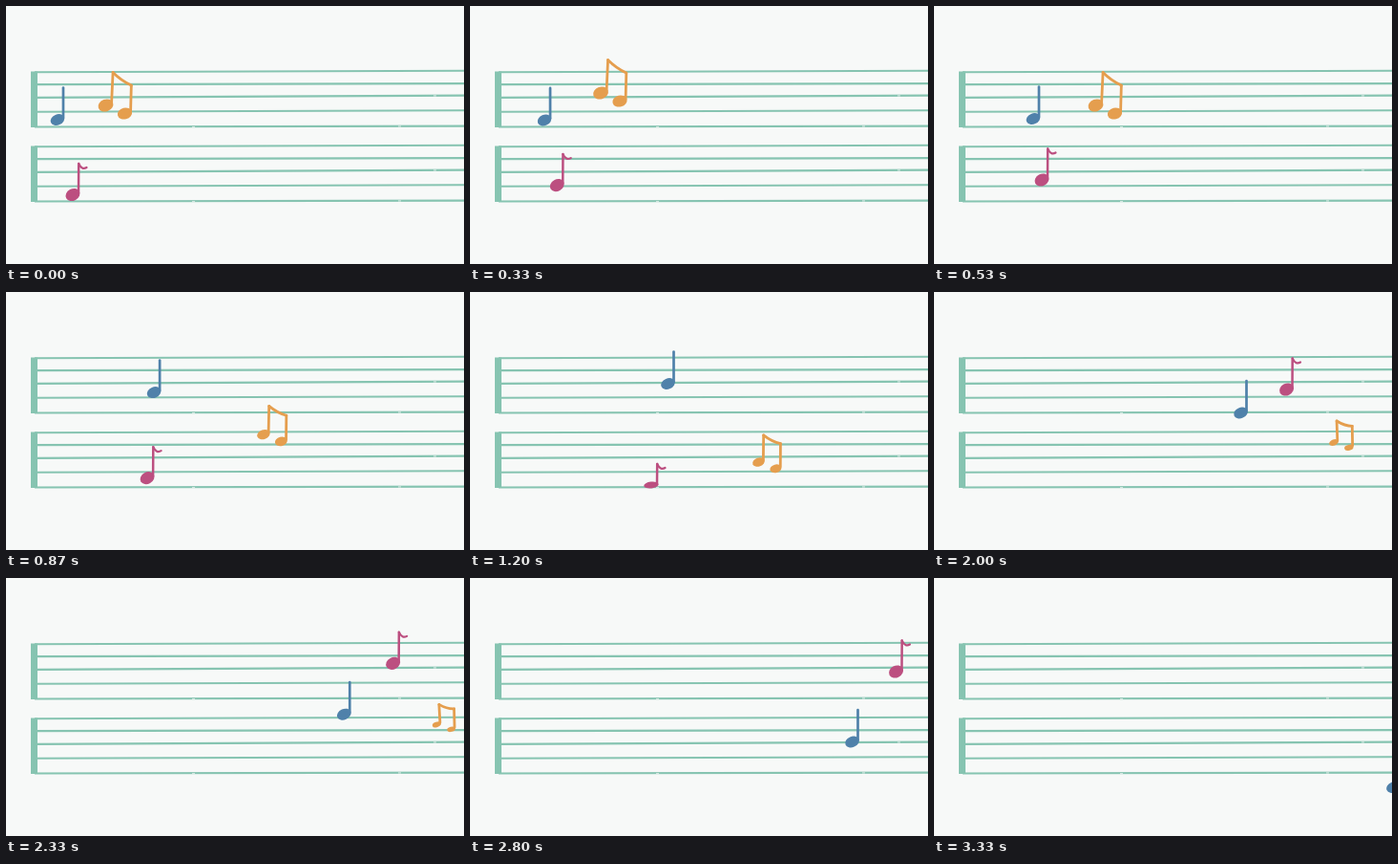
Recreate the animation shown at these times as an HTML page with a canvas. Size 480 by 270 pixels, loop 3.39 s.

```html
<!DOCTYPE html>
<html lang="en">
<head>
<meta charset="utf-8">
<title>Hopping notes</title>
<style>
html, body { margin: 0; width: 100%; height: 100%; overflow: hidden; background: #f7f9f8; }
canvas { display: block; width: 480px; height: 270px; }
</style>
</head>
<body>
<canvas id="stage" width="480" height="270"></canvas>
<script>
const ctx = document.getElementById('stage').getContext('2d');
const LOOP = 3390;
const PAPER = '#f7f9f8', GREEN = '#86c4b1';
const BLUE = '#4f81aa', ORANGE = '#e59e4e', PINK = '#bc4f80';

// Fifteen ticks a second; on these ticks the previous drawing is held.
const HELD = new Set([3, 9, 12, 14, 17, 20, 22, 25, 28, 31, 34, 36, 45, 47]);
const PINK_LANDING = 18;

// Points each note passes through: tick, x, y.
const bluePath = [[2, 54, 119], [8, 104, 118], [18, 207.5, 96], [24, 265.5, 120],
  [30, 321.5, 126.5], [42, 400.5, 171.5], [50, 481.5, 219]];
const pinkPath = [[2, 70, 197.5], [8, 113, 182], [18, 190, 202], [24, 276.5, 153],
  [30, 369.5, 102], [39, 428, 87], [42, 446.5, 98], [48, 492, 108]];
const pairPath = [[2, 104.5, 104], [5, 137, 91], [8, 169.5, 104], [11, 250, 134],
  [18, 302.5, 178], [24, 379, 170], [30, 419, 157.5], [41, 490, 150]];

// Smooth curve through the points of a path.
function along(path, tick) {
  const last = path.length - 1;
  const t = Math.min(Math.max(tick, path[0][0]), path[last][0]);
  let i = 0;
  while (i < last - 1 && t >= path[i + 1][0]) i++;
  const a = path[i], b = path[i + 1], span = b[0] - a[0];
  const u = (t - a[0]) / span, v = 1 - u;
  const slope = (k, c) => {
    const p = path[Math.max(k - 1, 0)], n = path[Math.min(k + 1, last)];
    return (n[c] - p[c]) / (n[0] - p[0]) * span;
  };
  return [1, 2].map(c =>
    a[c] * v * v * (1 + 2 * u) + b[c] * u * u * (3 - 2 * u) +
    slope(i, c) * u * v * v - slope(i + 1, c) * u * u * v);
}

function tickAt(time) {
  let tick = 0;
  while (10 * Math.round((tick + 1) * 20 / 3) <= time) tick++;
  return HELD.has(tick) ? tick - 1 : tick;
}

function ink(color) {
  ctx.fillStyle = ctx.strokeStyle = color;
  ctx.lineCap = ctx.lineJoin = 'round';
}

function head(x, y, rx, ry, tilt) {
  ctx.beginPath();
  ctx.ellipse(x, y, rx, ry, tilt, 0, Math.PI * 2);
  ctx.fill();
}

function line(width, x1, y1, x2, y2) {
  ctx.lineWidth = width;
  ctx.beginPath();
  ctx.moveTo(x1, y1);
  ctx.lineTo(x2, y2);
  ctx.stroke();
}

function curve(width, x1, y1, cx, cy, x2, y2) {
  ctx.lineWidth = width;
  ctx.beginPath();
  ctx.moveTo(x1, y1);
  ctx.quadraticCurveTo(cx, cy, x2, y2);
  ctx.stroke();
}

function drawStaff(top) {
  ink(GREEN);
  ctx.fillRect(26, top - .8, 7, 58.5);
  ctx.lineCap = 'butt';
  [1.5, 1, 2.3, 1.5, .9].forEach((rise, i) => {
    const y = top + 12.3 * i + .5 * i * i;
    line(2.1, 30, y, 480, y - rise);
  });
  // Small gaps in the crayon.
  ctx.fillStyle = 'rgba(247,249,248,.65)';
  for (const [x, y] of [[448, 24], [195, 56.7], [411, 56]]) ctx.fillRect(x, top + y, 3, 1.2);
}

function drawBlue(tick) {
  const [x, y] = along(bluePath, tick);
  ink(BLUE);
  head(x, y, 7.6, 5.6, -.42);
  line(2.7, x + 6, y - 2, x + 6, y - 33.5);
}

function drawPink(tick) {
  const [x, y] = along(pinkPath, tick);
  const squash = Math.exp(-(((tick - PINK_LANDING) / 2) ** 2));
  const sx = x + 6, top = y - 2.5 - 30 * (1 - .35 * squash);
  ink(PINK);
  head(x, y, 7.8, 6.2 * (1 - .45 * squash), -.5 + .38 * squash);
  line(2.5, sx, y - 2, sx + .2, top);
  curve(2.2, sx + .2, top, sx + 3.5, top + 7, sx + 8.5, top + 4);
}

// The beamed pair shrinks and flattens as it travels.
function drawPair(tick) {
  const [x, y] = along(pairPath, tick);
  const s = 1 - Math.max(0, x - 170) * .0015;
  const rx = 8.1 * s, ry = 6.3 * s ** 1.5;
  const gap = 20 * Math.sqrt(s), drop = 8.5 * s, lean = 6 * (s - .75);
  const x1 = x + rx * .75, x2 = x1 + gap;
  const top = y - 2.5 - 32 * s, low = top + 1.6 * drop * s;
  ink(ORANGE);
  head(x, y, rx, ry, -.35);
  head(x + gap, y + drop, rx * .95, ry * .95, -.25);
  line(2.8, x1, y - 2, x1 + lean, top);
  line(2.8, x2, y + drop - 2, x2 + lean / 2, low);
  curve(2.8, x1 + lean, top, (x1 + x2) / 2, top + drop, x2 + lean / 2, low);
}

function draw(time) {
  const tick = tickAt(time % LOOP);
  ctx.fillStyle = PAPER;
  ctx.fillRect(0, 0, 480, 270);
  drawStaff(69.3);
  drawStaff(147.3);
  drawPair(tick);
  drawBlue(tick);
  drawPink(tick);
}

const start = performance.now();
function loop() {
  draw(performance.now() - start);
  requestAnimationFrame(loop);
}
loop();
</script>
</body>
</html>
```
